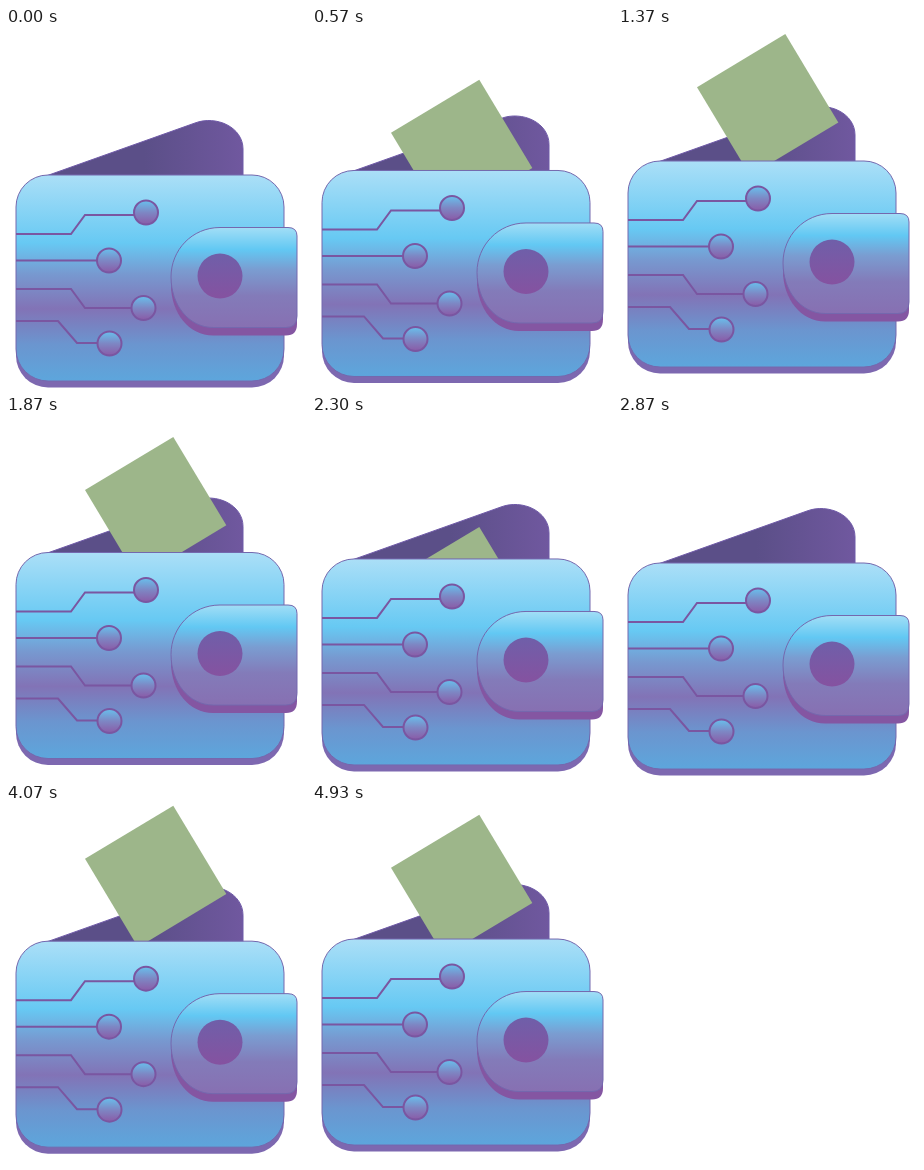
Recreate the animation shown at these times as an HTML page. Size 300 by 360 pixels, loop 5 s.

```html
<!DOCTYPE html>
<html lang="en">
<head>
<meta charset="utf-8">
<title>Wallet</title>
<style>
  html, body { margin: 0; width: 100%; height: 100%; overflow: hidden; background: #fff; }
  svg { display: block; width: 100vw; height: 100vh; }
</style>
</head>
<body>
<svg viewBox="0 0 300 360">
  <defs>
    <linearGradient id="flap">
      <stop offset=".5" stop-color="#5b4f88"/>
      <stop offset="1" stop-color="#70589f"/>
    </linearGradient>
    <linearGradient id="face" x2="0" y2="1">
      <stop offset="0" stop-color="#abdff7"/>
      <stop offset=".33" stop-color="#67c9f3"/>
      <stop offset=".48" stop-color="#7799d0"/>
      <stop offset=".65" stop-color="#8273b6"/>
      <stop offset=".82" stop-color="#6b95cf"/>
      <stop offset="1" stop-color="#5da6dc"/>
    </linearGradient>
    <linearGradient id="clasp" x2="0" y2="1">
      <stop offset="0" stop-color="#a2def6"/>
      <stop offset=".22" stop-color="#62c8f3"/>
      <stop offset=".42" stop-color="#7a9dd1"/>
      <stop offset=".68" stop-color="#837bb9"/>
      <stop offset="1" stop-color="#8770b2"/>
    </linearGradient>
    <linearGradient id="button" x2="0" y2="1">
      <stop offset="0" stop-color="#6f5fa9"/>
      <stop offset="1" stop-color="#8552a0"/>
    </linearGradient>
    <linearGradient id="node" x2="0" y2="1">
      <stop offset="0" stop-color="#68c0ed"/>
      <stop offset=".5" stop-color="#7d87c4"/>
      <stop offset="1" stop-color="#8a5ba7"/>
    </linearGradient>
    <path id="tab" d="M214 199.5H282Q291 199.5 291 208V288Q291 299.5 280 299.5H207C183 299.5 165 277 165 249C165 222 186 199.5 214 199.5Z"/>
  </defs>

  <path id="back" d="M40 148L189 95C210 87 237 99 237 121V165H40Z" fill="url(#flap)" stroke="#6f5aa8"/>
  <rect id="token" width="103" height="103" fill="#9db68a"/>
  <g id="wallet">
    <rect x="10" y="154" width="268" height="205.5" rx="32" fill="#7d68b0"/>
    <rect x="10" y="147" width="268" height="206" rx="32" fill="url(#face)" stroke="#7468ae"/>
    <g fill="none" stroke="#7a56a1" stroke-width="2">
      <path d="M10 206H65L79 187H128M10 232.500H91M10 261H65L79 280H125M10 293H52L71 315H91"/>
      <g fill="url(#node)">
        <circle cx="140" cy="184.500" r="12"/>
        <circle cx="103" cy="232.500" r="12"/>
        <circle cx="137.500" cy="280" r="12"/>
        <circle cx="103.500" cy="315.500" r="12"/>
      </g>
    </g>
    <use href="#tab" y="8" fill="#8456a2"/>
    <use href="#tab" fill="url(#clasp)" stroke="#7468ae"/>
    <circle cx="214" cy="248" r="22.500" fill="url(#button)"/>
  </g>
</svg>
<script>
  const LOOP = 5000, CYCLE = 3180;
  const [back, token, wallet] = ['back', 'token', 'wallet'].map(id => document.getElementById(id));

  // Top of the token: [ms, y]
  const keys = [
    [0, 160], [220, 140], [400, 98], [570, 50], [700, 19], [860, 1], [980, 1], [1130, 4],
    [1500, 4], [1660, 4], [1870, 19], [2030, 45], [2185, 77], [2400, 135], [2560, 160], [CYCLE, 160]
  ];

  const slope = i => {
    const a = keys[i - 1], b = keys[i + 1];
    return a && b ? (b[1] - a[1]) / (b[0] - a[0]) : 0;
  };

  // Smooth curve through the keys
  function tokenTop(t) {
    const i = keys.findIndex(k => t < k[0]) - 1;
    const [t0, y0] = keys[i], [t1, y1] = keys[i + 1];
    const d = t1 - t0, u = (t - t0) / d, v = 1 - u;
    return v * v * ((1 + 2 * u) * y0 + u * d * slope(i))
         + u * u * ((1 + 2 * v) * y1 - v * d * slope(i + 1));
  }

  const ease = (t, from, to) => {
    const u = Math.min(1, Math.max(0, (t - from) / (to - from)));
    return (1 - Math.cos(Math.PI * u)) / 2;
  };

  function draw(now) {
    const t = now % LOOP % CYCLE;
    const bob = -14 * (ease(t, 73, 1366) - ease(t, 1400, 2810));
    const shift = `translate(0 ${bob})`;
    back.setAttribute('transform', shift);
    wallet.setAttribute('transform', shift);
    token.setAttribute('transform', `translate(79 ${tokenTop(t) + 55}) rotate(-31)`);
  }

  const start = performance.now();
  function tick() {
    draw(performance.now() - start);
    requestAnimationFrame(tick);
  }
  tick();
</script>
</body>
</html>
```
